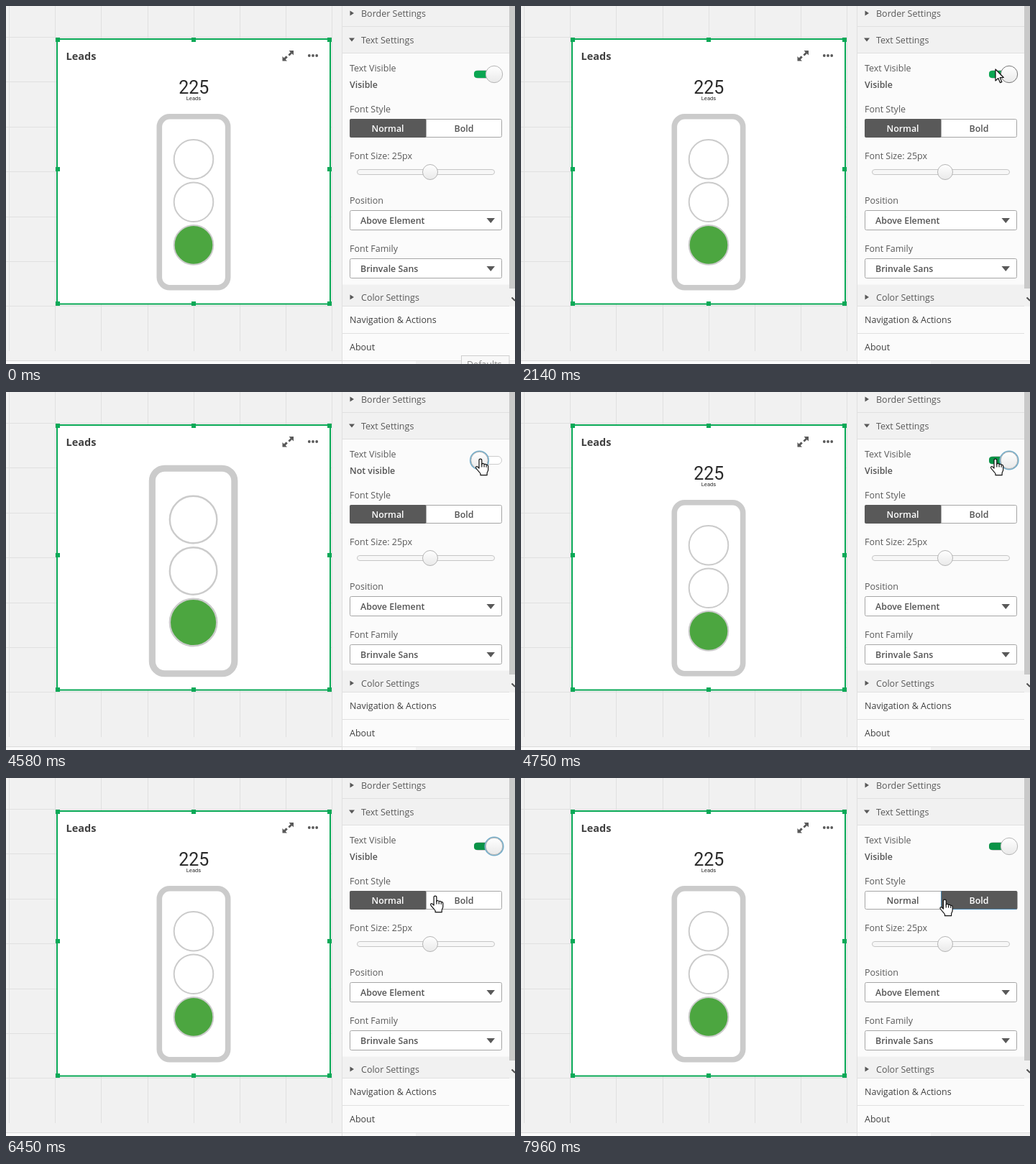
An HTML page for the animation above (7.99 s loop, 708x498 px).

```html
<!DOCTYPE html>
<html lang="en">
<head>
<meta charset="utf-8">
<title>Text settings</title>
<style>
html, body { margin: 0; width: 100%; height: 100%; overflow: hidden; background: #f1f1f1; }
svg { display: block; width: 708px; height: 498px; }
text { font: 12.5px "Open Sans", "Noto Sans", sans-serif; fill: #595959; }
.b { font-weight: 600; font-size: 12.4px; fill: #545454; }
.dark { fill: #404040; }
.title { font-weight: 700; font-size: 14.5px; fill: #404040; }
.mid { text-anchor: middle; }
.kpi text { font-family: Roboto, "Noto Sans", sans-serif; fill: #2b2b2b; text-anchor: middle; }
.icon { fill: #595959; }
.ctl { fill: #fff; stroke: #a6a6a6; }
</style>
</head>
<body>
<svg viewBox="0 0 708 498">
  <defs>
    <linearGradient id="knobFill" x1="0" y1="0" x2="0" y2="1">
      <stop offset="0" stop-color="#fff"/><stop offset="1" stop-color="#e9e9e9"/>
    </linearGradient>
  </defs>
  <rect width="708" height="498" fill="#f1f1f1"/>
  <path id="grid" fill="none" stroke="#e0e0e0"/>
  <rect y="493" width="468" height="5" fill="#fafafa"/>
  <path d="M0 493.5H468" stroke="#d9d9d9"/>

  <rect x="71" y="46" width="380" height="368.5" fill="#fff" stroke="#0aa957" stroke-width="2"/>
  <path id="handles" fill="#0aa957"/>
  <text class="title" x="83.5" y="75">Leads</text>
  <path class="icon" d="M393.5 62H400V68.5L397.8 66.3L394.3 69.6L392.4 67.7L395.7 64.2ZM384.500 70V76.500H391L388.800 74.300L391.800 71.400L389.700 69.300L386.700 72.200Z"/>
  <g class="icon"><circle cx="421.800" cy="69" r="1.9"/><circle cx="427" cy="69" r="1.9"/><circle cx="432.200" cy="69" r="1.9"/></g>
  <g class="kpi" id="kpi">
    <text x="261.300" y="122" style="font-size:25px">225</text>
    <text x="261" y="131" style="font-size:7.600px">Leads</text>
  </g>
  <g id="light" stroke="#cbcbcb" fill="#fff">
    <rect x="-47.700" y="-119" width="95.400" height="238" rx="14.500" stroke-width="7.600"/>
    <g stroke-width="2">
      <circle cy="-59.600" r="27.300"/><circle r="27.300"/><circle cy="59.600" r="27.300" fill="#4ca640"/>
    </g>
  </g>

  <rect x="468" width="232" height="498" fill="#fbfbfb"/>
  <path d="M468 0H700V65H468ZM468 387.500H700V417H468ZM570 494H700V498H570Z" fill="#f1f1f1"/>
  <path d="M467.500 0V498M468 28.500H700M468 65.500H700M468 417.500H708M468 455.500H708M468 493.500H708" stroke="#e0e0e0"/>
  <rect x="700" width="8" height="418" fill="#f1f1f1"/>
  <rect x="700" y="418" width="8" height="75" fill="#fbfbfb"/>
  <rect x="700" width="8" height="393" fill="#c9c9c9"/>
  <path d="M703.500 405.500L708 410" stroke="#505050" stroke-width="2"/>
  <path class="icon" d="M478.500 6.500L484 10L478.500 13.500ZM477 44.500H485L481 49.500ZM478.500 401.500L484 405L478.500 408.500Z"/>

  <text x="494" y="15">Border Settings</text>
  <text x="494" y="52">Text Settings</text>
  <text x="494" y="410">Color Settings</text>
  <text x="478" y="91">Text Visible</text>
  <text x="478" y="114" class="b" id="state"></text>
  <text x="478" y="148">Font Style</text>
  <text x="478" y="213">Font Size: 25px</text>
  <text x="478" y="275">Position</text>
  <text x="478" y="342">Font Family</text>
  <text x="478" y="441" class="dark">Navigation &amp; Actions</text>
  <text x="478" y="479" class="dark">About</text>

  <rect id="track" x="651.500" y="89.500" width="38" height="11" rx="5.500" fill="#fff" stroke="#ccc"/>
  <rect id="trackOn" x="651" y="90" height="10" rx="4"/>
  <circle id="ring" cy="95" r="12.600" fill="none" stroke="#74aecb" stroke-width="2"/>
  <circle id="knob" cy="95" r="11.700" fill="url(#knobFill)"/>

  <rect class="ctl" x="478.500" y="157.500" width="211" height="25" rx="2"/>
  <rect id="chosen" y="157" width="106.500" height="26" rx="2" fill="#595959"/>
  <path d="M584.500 158V182" stroke="#a6a6a6"/>
  <path id="focus" d="M584.500 157V182.500H689" fill="none" stroke="#4b87b0"/>
  <text id="normal" class="b mid" x="531" y="175">Normal</text>
  <text id="bold" class="b mid" x="637" y="175">Bold</text>

  <rect x="488.500" y="227.500" width="191" height="7" rx="3.500" fill="#f7f7f7" stroke="#c6c6c6"/>
  <circle cx="590" cy="231" r="10.500" fill="url(#knobFill)" stroke="#b5b5b5"/>

  <rect class="ctl" x="478.500" y="284.500" width="211" height="27" rx="2"/>
  <rect class="ctl" x="478.500" y="351.500" width="211" height="27" rx="2"/>
  <path class="icon" d="M668.500 295H680L674.300 302ZM668.500 362H680L674.300 369Z"/>
  <text class="b" x="493" y="303">Above Element</text>
  <text class="b" x="493" y="370">Brinvale Sans</text>

  <g id="tip">
    <rect x="633.500" y="486.500" width="66.500" height="20" fill="#f8f8f8" stroke="#cfcfcf"/>
    <text x="641" y="502.500" style="fill:#8a8a8a">Defaults</text>
  </g>

  <g id="cursor" fill="#fff" stroke="#111" stroke-width="1.200" stroke-linejoin="round">
    <path id="arrow" d="M0 0V16L3.800 12.400L6.400 18.600L8.800 17.600L6.200 11.500H11.300Z"/>
    <g id="hand">
      <path d="M-2 2a1.900 1.900 0 0 1 3.800 0V7.500c0-1.500 3.300-1.500 3.300 .6c.4-1.200 3.100-1 3.100 .9c.5-1 2.500-.6 2.500 1.300V15c0 2.200-1.300 3-1.600 5V22.700H0V20.500C-2 18-4 16-6.200 13c-1-1.800 .6-3 2.200-1.900L-2 13Z"/>
      <path d="M1.800 7V11.500M5.100 8.500V11.500M8.200 9.500V11.800" fill="none"/>
    </g>
  </g>
</svg>
<script>
const LOOP = 7990;
const $ = id => document.getElementById(id);
const set = (id, attrs) => { for (const k in attrs) $(id).setAttribute(k, attrs[k]); };
const show = (id, on) => set(id, { visibility: on ? "visible" : "hidden" });

// Cursor stops: time, x, y of the pointer tip
const PATH = [
  [540, 622, 500], [960, 641, 252], [1090, 667, 205], [1240, 665.5, 153],
  [1330, 663, 117], [1360, 663, 117], [1650, 660, 93], [4980, 660, 93],
  [5590, 567, 182], [6360, 567, 182], [6450, 597, 164], [6580, 612, 167],
  [7840, 612, 167], [7960, 589.5, 169], [LOOP, 589.5, 169]
];
// Vertical bands where the pointer becomes a hand
const BANDS = [[0, 120], [150, 186], [220, 238], [284, 312], [351, 379], [387, 500]];

let d = "";
for (let i = 0; i < 8; i++) d += `M${4.5 + Math.round(i * 64.2)} 0V480`;
for (let i = 0; i < 7; i++) d += `M0 ${43.5 + Math.round(i * 62.4)}H453`;
set("grid", { d });

d = "";
for (const x of [72, 261, 450]) for (const y of [47, 227, 414])
  if (x !== 261 || y !== 227) d += `M${x - 3} ${y - 3}h6v6h-6Z`;
set("handles", { d });

const ramp = (t, a, b) => {
  const p = Math.min(1, Math.max(0, (t - a) / (b - a)));
  return p * p * (3 - 2 * p);
};

function pointer(t) {
  if (t >= 2140 && t < 2240) return [660, 88, false];
  const i = PATH.findIndex(p => p[0] > t);
  const [t0, x0, y0] = PATH[i - 1], [t1, x1, y1] = PATH[i];
  const p = (t - t0) / (t1 - t0);
  const y = y0 + (y1 - y0) * p;
  return [x0 + (x1 - x0) * p, y, BANDS.some(([a, b]) => y >= a && y <= b)];
}

function draw(t) {
  set("tip", { opacity: t < 30 ? 1 : t < 50 ? 0.4 : 0 });

  const on = 1 - ramp(t, 2550, 2700) + ramp(t, 4580, 4740);
  const x = 658.5 + 20.5 * on;
  const hover = t >= 1600 && t < 2550;
  set("knob", { cx: x, stroke: hover ? "#777" : "#b5b5b5" });
  set("ring", { cx: x });
  show("ring", t >= 2560 && t < 6850);
  set("trackOn", { width: x - 651, opacity: on, fill: t < 2550 ? "#0aa652" : "#0a9347" });
  $("state").textContent = t >= 2580 && t < 4610 ? "Not visible" : "Visible";

  const big = t >= 2640 && t < 4670;
  show("kpi", !big);
  $("kpi").style.fontWeight = t >= 6960 ? 700 : 400;
  set("light", { transform: big ? "translate(260.6 249) scale(1.2)" : "translate(261 272.800)" });

  const bold = t >= 6850;
  set("chosen", { x: bold ? 584 : 478 });
  show("focus", bold);
  $("normal").style.fill = bold ? "#545454" : "#fff";
  $("bold").style.fill = bold ? "#fff" : "#545454";

  show("cursor", t >= 540);
  if (t >= 540) {
    const [cx, cy, hand] = pointer(t);
    set("cursor", { transform: `translate(${cx} ${cy})` });
    set("hand", { opacity: hand ? 1 : 0 });
    set("arrow", { opacity: hand ? 0 : 1 });
  }
}

const start = performance.now();
function tick() {
  draw((performance.now() - start) % LOOP);
  requestAnimationFrame(tick);
}
tick();
</script>
</body>
</html>
```
